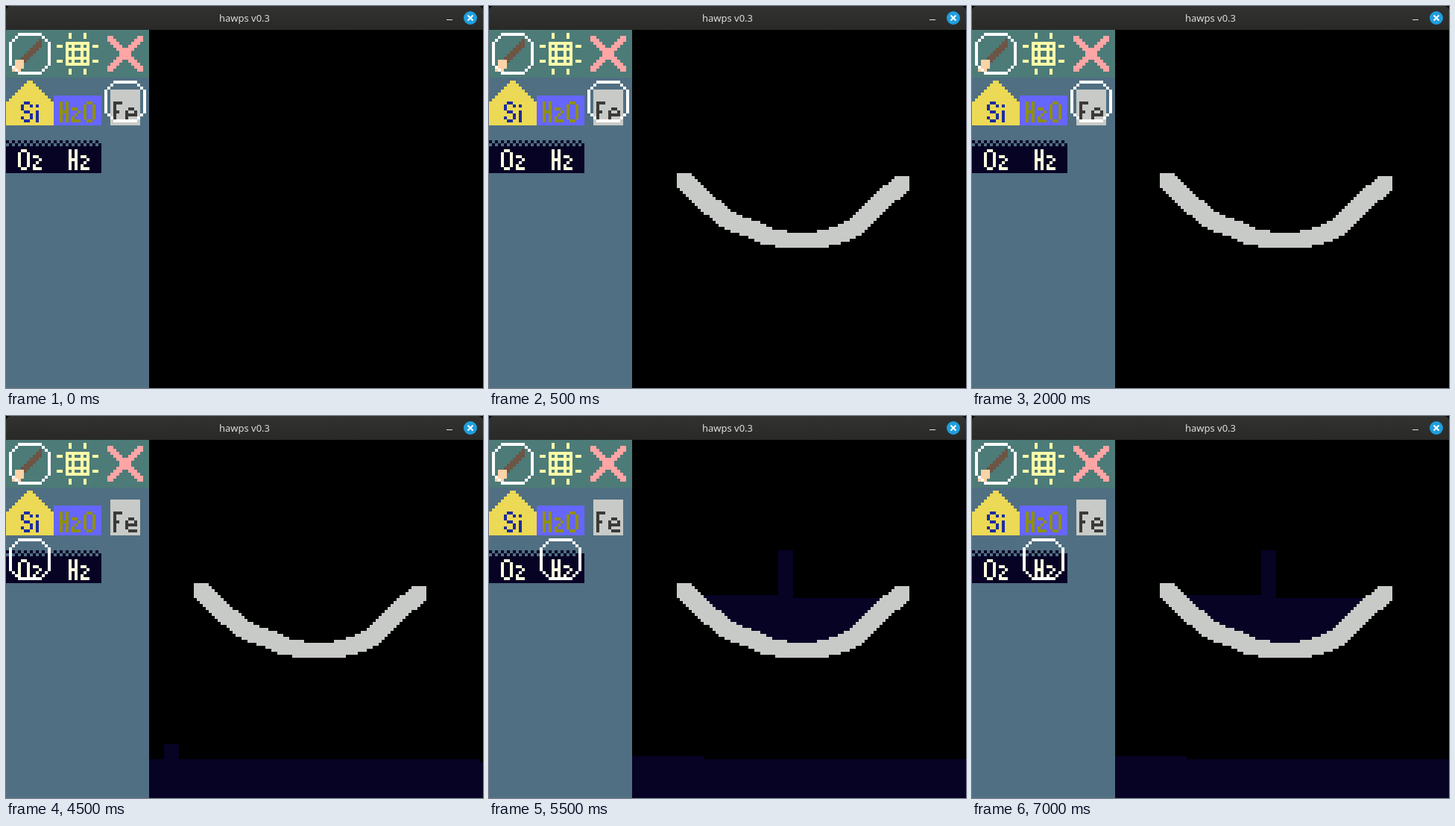
Write an HTML page with a canvas that moves like this. It is 640 px wide and 512 px high and loops after 8 s.

```html
<!DOCTYPE html>
<html lang="en">
<head>
<meta charset="utf-8">
<title>hawps v0.3</title>
<style>
html, body { margin: 0; width: 100%; height: 100%; overflow: hidden; background: #000; }
#stage { position: relative; width: 640px; height: 512px; overflow: hidden; }
header {
  position: absolute; left: 0; top: 0; width: 640px; height: 32px;
  border-radius: 6px 6px 0 0;
  background: linear-gradient(#323331, #292a28);
  color: #dcdcdc; font: 13px/32px "Noto Sans", "Open Sans", sans-serif; text-align: center;
}
header svg { position: absolute; left: 580px; top: 0; }
canvas { position: absolute; left: 0; top: 32px; width: 640px; height: 480px; image-rendering: pixelated; }
</style>
</head>
<body>
<div id="stage">
  <header>hawps v0.3
    <svg width="60" height="32">
      <path d="M11 18.5h8" stroke="#e6e6e6"/>
      <circle cx="43" cy="16" r="9" fill="#1f9ede"/>
      <path d="M39.5 12.5l7 7m0-7l-7 7" stroke="#fff" stroke-width="2"/>
    </svg>
  </header>
  <canvas width="160" height="120"></canvas>
</div>
<script>
const LOOP = 8000;
const CUTS = [500, 3000, 5500];
const STEEL = '#c8cac7', GAS = '#070325', CREAM = '#fdfbe0', LIGHT = '#fdfda8';

const GLYPHS = {
  S: '.##. #..# #... .##. ...# #..# .##.',
  i: '. # . # # # #',
  H: '#.# #.# #.# ### #.# #.# #.#',
  O: '.##. #..# #..# #..# #..# #..# .##.',
  F: '### #.. #.. ##. #.. #.. #..',
  e: '.... .... .##. #..# #### #... .###',
  2: '... ... ##. ..# .#. #.. ###'
};

// Upper-left corners of the 5x5 brush along the bowl
const BOWL = [[63, 56], [70, 63], [75, 67], [79, 70], [85, 72], [91, 74.5], [98, 76],
  [108, 76], [115, 74], [120, 71.5], [125, 67], [130, 62], [136, 57]];

const ctx = document.querySelector('canvas').getContext('2d');
ctx.translate(0, -8); // one unit is a 4px cell, counted from the stage top

function box(color, x, y, w = 1, h = 1) {
  ctx.fillStyle = color;
  ctx.fillRect(x, y, w, h);
}

function text(color, str, x, y) {
  for (const ch of str) {
    const rows = GLYPHS[ch].split(' ');
    rows.forEach((row, j) => [...row].forEach((c, i) => {
      if (c === '#') box(color, x + i, y + j);
    }));
    x += rows[0].length + 1;
  }
}

function ring(x, y) {
  for (const far of [1, 14]) {
    box('#fff', x + 4, y + far, 8, 1);
    box('#fff', x + far, y + 4, 1, 8);
  }
  for (const [a, b] of [[3, 2], [2, 3]]) {
    for (const cx of [a, 15 - a]) for (const cy of [b, 15 - b]) box('#fff', x + cx, y + cy);
  }
}

function brushIcon(x, y) {
  for (let k = 0; k < 8; k++) box('#6d5444', x + 11 - k, y + 3 + k, k ? 2 : 1, 2);
  box('#fcd3a6', x + 3, y + 10, 3, 3);
  box('#fcd3a6', x + 2, y + 12, 3, 2);
}

function gridIcon(x, y) {
  for (const k of [4, 6, 9, 11]) {
    box(LIGHT, x + k, y + 4, 1, 8);
    box(LIGHT, x + 4, y + k, 8, 1);
  }
  for (const k of [5, 10]) for (const end of [1, 13]) {
    box(LIGHT, x + k, y + end, 1, 2);
    box(LIGHT, x + end, y + k, 2, 1);
  }
}

function crossIcon(x, y) {
  for (let i = 2; i < 14; i++) for (let j = 2; j < 14; j++) {
    if (Math.abs(i - j) < 2 || Math.abs(i + j - 15) < 2) box('#ffa5a5', x + i, y + j);
  }
}

function panel(scene) {
  box('#506f82', 0, 8, 48, 120);
  box('#4d7b78', 0, 8, 48, 16);
  brushIcon(0, 8);
  gridIcon(16, 8);
  crossIcon(32, 8);

  for (let k = 0; k < 7; k++) box('#ecd955', 7 - k, 25 + k, 2 + 2 * k, 1);
  box('#ecd955', 0, 32, 16, 8);
  text('#1c2ca0', 'Si', 5, 32);
  box('#6666ff', 16, 30, 16, 10);
  text('#90900c', 'H2O', 18, 32);
  box(STEEL, 35, 28, 10, 12);
  text('#3a3a38', 'Fe', 36, 32);

  for (let x = 0; x < 32; x++) box(GAS, x, 45 + x % 2);
  box(GAS, 0, 47, 32, 9);
  text(CREAM, 'O2', 4, 48);
  text(CREAM, 'H2', 21, 48);

  ring(0, 8);
  if (scene < 2) ring(32, 24);
  else ring(scene === 2 ? 0 : 16, 40);
}

function alongBowl(visit) {
  for (let k = 1; k < BOWL.length; k++) {
    const [x0, y0] = BOWL[k - 1], [x1, y1] = BOWL[k];
    const n = Math.ceil(x1 - x0);
    for (let s = 0; s <= n; s++) {
      visit(Math.round(x0 + (x1 - x0) * s / n), Math.round(y0 + (y1 - y0) * s / n));
    }
  }
}

function lake() {
  alongBowl((x, y) => {
    const top = x + 2 < 97 ? 60 : 61;
    if (y + 2 > top) box(GAS, x + 2, top, 1, y + 2 - top);
  });
  box(GAS, 97, 45, 5, 16);
}

function draw(scene) {
  box('#000', 0, 8, 160, 120);
  if (scene >= 2) box(GAS, 48, 115, 112, 13);
  if (scene === 2) {
    box(GAS, 53, 110, 5, 5);
    box('#000', 159, 115);
  }
  if (scene === 3) {
    box(GAS, 48, 114, 24, 1);
    lake();
  }
  if (scene >= 1) alongBowl((x, y) => box(STEEL, x, y, 5, 5));
  panel(scene);
}

let shown = -1;
const start = performance.now();
function tick() {
  const t = (performance.now() - start) % LOOP;
  const scene = CUTS.filter(cut => t >= cut).length;
  if (scene !== shown) draw(shown = scene);
  requestAnimationFrame(tick);
}
tick();
</script>
</body>
</html>
```
